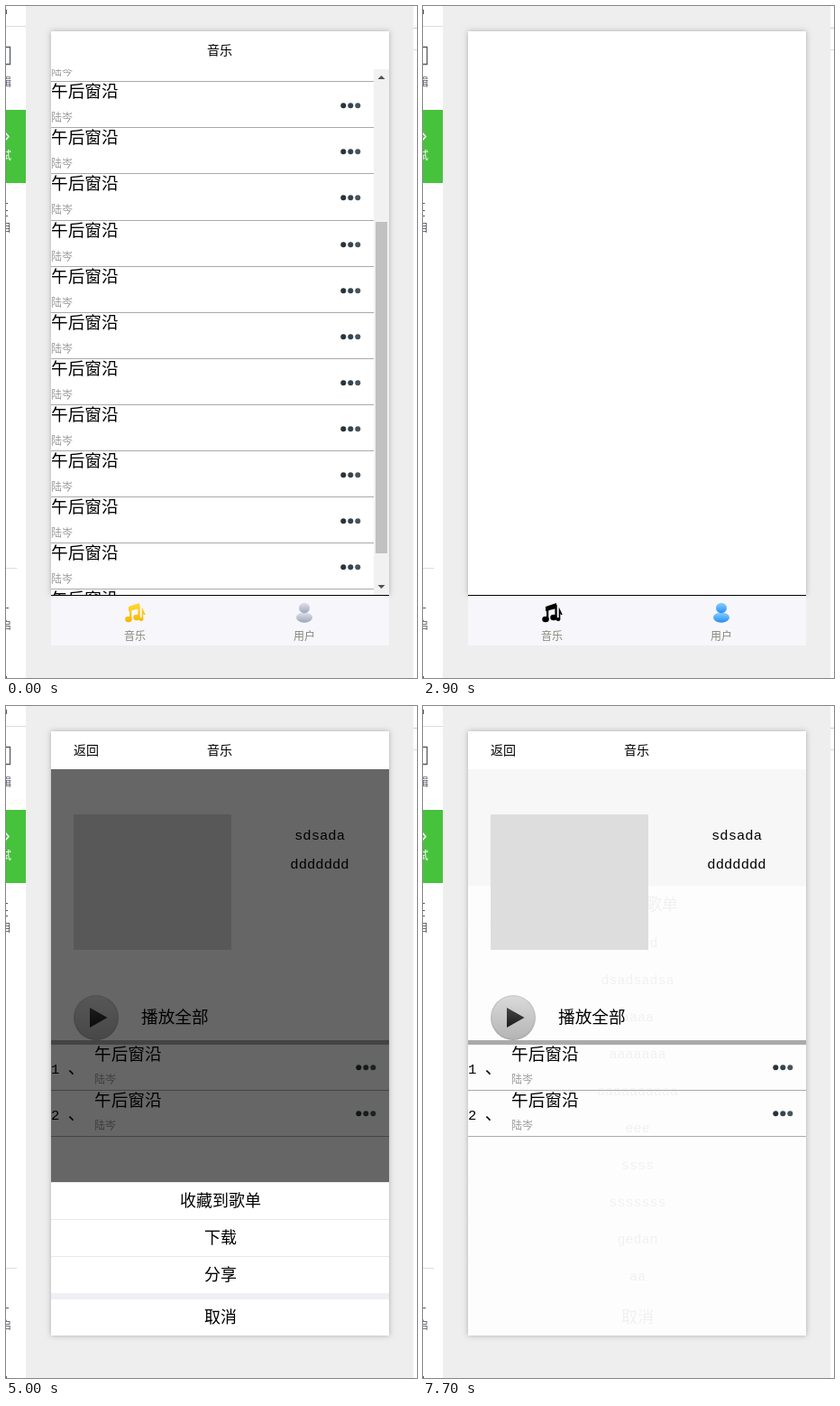
Animation of 456 by 744 pixels, one loop 9100 ms. Source, as an HTML page with a canvas:

```html
<!DOCTYPE html>
<html lang="zh">
<head>
<meta charset="utf-8">
<title>音乐</title>
<style>
html, body { margin: 0; width: 100%; height: 100%; overflow: hidden; background: #eee; }
canvas { display: block; }
</style>
</head>
<body>
<canvas id="stage" width="456" height="744"></canvas>
<script>
const c = document.getElementById('stage').getContext('2d');
const LOOP = 9100, ROW = 51.07;
const SONG = '午后窗沿', SINGER = '陆岑';
const LISTS = ['sdasd', 'dsadsadsa', 'aaaa', 'aaaaaaa', 'aaaaaaaaaa', 'eee', 'ssss', 'sssssss', 'gedan', 'aa'];
const COUNTS = [2, 2, 1, 2, 1, 1, 2, 2, 1, 1];
const ACTIONS = ['收藏到歌单', '下载', '分享'];
const PICK = ['+ 新建歌单', ...LISTS];
const SLIDE = [292, 110, 42, 10, 0];

function box(x, y, w, h, color) {
  c.fillStyle = color;
  c.fillRect(x, y, w, h);
}

// Latin runs are set half as wide as a CJK character.
function text(s, x, mid, size, color = '#000', center = false) {
  const runs = s.match(/[ -~]+|[^ -~]+/g);
  const latin = r => r.charCodeAt(0) < 128;
  const width = r => r.length * size * (latin(r) ? 0.5 : 1);
  if (center) x -= runs.reduce((sum, r) => sum + width(r), 0) / 2;
  c.fillStyle = color;
  for (const r of runs) {
    c.font = latin(r)
      ? `${size / 1.2}px "Liberation Mono", monospace`
      : `300 ${size}px "Noto Sans CJK SC Light", "Noto Sans CJK SC", "Noto Sans CJK", sans-serif`;
    c.fillText(r, x, mid + size * 0.37);
    x += width(r);
  }
}

function shape(color, ...points) {
  c.fillStyle = color;
  c.beginPath();
  points.forEach(([x, y]) => c.lineTo(x, y));
  c.fill();
}

function oval(x, y, rx, ry, color) {
  c.fillStyle = color;
  c.beginPath();
  c.ellipse(x, y, rx, ry, 0, 0, 7);
  c.fill();
}

function line(color, width, ...points) {
  c.strokeStyle = color;
  c.lineWidth = width;
  c.beginPath();
  points.forEach(([x, y]) => c.lineTo(x, y));
  c.stroke();
}

function shade(y1, y2, from, to) {
  const g = c.createLinearGradient(0, y1, 0, y2);
  g.addColorStop(0, from);
  g.addColorStop(1, to);
  return g;
}

function clipped(x, y, w, h, draw) {
  c.save();
  c.beginPath();
  c.rect(x, y, w, h);
  c.clip();
  draw();
  c.restore();
}

function dots(x, y) {
  ['#2a333a', '#37434c', '#455560'].forEach((color, i) => oval(x + 8 * i, y, 3, 3, color));
}

function note(x, y, color) {
  oval(x - 6, y + 7, 4.2, 3.4, color);
  oval(x + 6, y + 5, 4.2, 3.4, color);
  shape(color, [x - 5, y - 7], [x + 10, y - 10], [x + 10, y - 4], [x - 5, y - 1]);
  box(x - 5, y - 6, 3, 13, color);
  box(x + 7.5, y - 9, 2.7, 14, color);
}

function surroundings() {
  box(0, 0, 456, 744, '#eee');
  box(0, 0, 22, 744, '#fff');
  box(452, 0, 4, 744, '#fff');
  box(452, 24, 4, 1, '#ccc');
  box(452, 48, 4, 1, '#ddd');
  box(0, 22, 22, 1, '#ddd');
  box(0, 622, 12, 1, '#ddd');
  box(0, 115, 22, 81, '#47c23c');
  const ink = '#555b66';
  line(ink, 1.3, [-6, 45.5], [4.5, 45.5], [4.5, 64.5], [-6, 64.5]);
  line('#fff', 1.5, [-1, 140], [3, 144.5], [-1, 149]);
  [218, 226, 232].forEach(y => box(0, y, 2, 1, ink));
  box(0, 666, 3, 1, ink);
  box(0, 4, 1, 5, ink);
  box(0, 742, 1, 2, ink);
  text('编辑', -18, 85, 12, ink);
  text('调试', -18, 166, 12, '#fff');
  text('项目', -18, 246, 12, ink);
  text('重启', -18, 686, 12, ink);
}

function phone(title, height, back) {
  c.save();
  c.shadowColor = 'rgba(0,0,0,.28)';
  c.shadowBlur = 6;
  box(50, 28, 375, height, '#fff');
  c.restore();
  text(title, 237, 49, 14, '#000', true);
  if (back) text('返回', 75, 49, 14);
}

function scrollbar(top, height) {
  box(408, 70, 17, 582, '#f1f1f1');
  box(410, top, 13, height, '#c1c1c1');
  shape('#505050', [412.5, 81], [420.5, 81], [416.5, 77]);
  shape('#505050', [412.5, 641], [420.5, 641], [416.5, 645]);
}

function tabs(user) {
  box(50, 652, 375, 56, '#f7f7fb');
  box(50, 652, 375, 1, '#000');
  const color = user ? '#000' : shade(661, 684, '#ffd836', '#f5b400');
  oval(136, 679, 3.8, 3.2, color);
  oval(145, 677, 3.8, 3.2, color);
  shape(color, [136, 665], [148, 661], [148, 667], [136, 670]);
  box(137, 666, 2.3, 13, color);
  box(146.4, 663, 2.3, 14, color);
  oval(150, 679, 2.4, 2, color);
  line(color, 1.6, [151.5, 679], [151.5, 669], [154, 674]);
  const [light, dark] = user ? ['#8fd3ff', '#2389f5'] : ['#e2e4ec', '#9ba3b8'];
  oval(331, 677, 9, 5.7, shade(671, 683, light, dark));
  oval(331, 666.5, 6, 5.8, shade(660, 673, light, dark));
  text('音乐', 131, 697.5, 12, '#85857a');
  text('用户', 319, 697.5, 12, '#85857a');
}

function musicPage() {
  phone('音乐', 624);
  clipped(50, 70, 375, 582, () => {
    for (let i = -1; i < 12; i++) {
      const y = Math.round(83.35 + ROW * i);
      box(50, y, 358, 1, '#aaa');
      text(SONG, 50, y + 11, 18.67);
      text(SINGER, 50, y + 41, 12, '#999');
      dots(374.3, y + 27.3);
    }
    scrollbar(239, 367);
  });
  tabs(false);
}

function menuIcons() {
  const green = '#19f590';
  c.lineJoin = 'round';
  line(green, 2, [71, 97], [74, 87], [86, 87], [89, 97], [89, 105], [71, 105], [71, 97]);
  line(green, 2, [71, 98], [76, 98], [77, 101], [83, 101], [84, 98], [89, 98]);
  line(green, 2, [80, 89], [80, 95]);
  line(green, 2, [77, 93], [80, 96], [83, 93]);
  c.lineWidth = 2;
  c.beginPath();
  c.arc(80, 147, 9, 0, 7);
  c.stroke();
  line(green, 2, [79.5, 141], [79.5, 148], [85, 148]);
  note(80, 198, green);
}

function userPage(loaded) {
  phone('我的歌单', 624);
  clipped(50, 70, 375, 582, () => {
    ['下载音乐', '最近播放', '我创建的歌单'].forEach((s, i) => {
      text(s, 101, 94 + 51 * i, 18.67);
      box(50, 120 + 51 * i, 375, 1, '#aaa');
    });
    menuIcons();
    if (!loaded) return;
    box(50, 223, 50, 429, '#cacaca');
    LISTS.forEach((name, i) => {
      const y = 222 + 51 * i;
      text(name, 110, y + 19, 12);
      text(COUNTS[i] + '首 已下载首', 110, y + 42, 12);
      box(100, y + 51, 325, 1, '#c8c8c8');
    });
    scrollbar(87, 481);
  });
  tabs(true);
}

function details() {
  box(75, 120, 175, 150, '#ddd');
  text('sdsada', 348, 141, 18.67, '#000', true);
  text('ddddddd', 348, 173, 18.67, '#000', true);
  oval(100, 345, 25, 25, shade(320, 370, '#cfcfcf', '#a8a8a8'));
  oval(100, 345, 23.5, 23.5, shade(321, 369, '#dadada', '#b4b4b4'));
  shape(shade(334, 356, '#444', '#1c1c1c'), [93, 334], [112.5, 345], [93, 356]);
  text('播放全部', 150, 344, 18.67);
  box(50, 370, 375, 5, '#aaa');
  [1, 2].forEach((n, i) => {
    const y = 374 + 51 * i;
    text(n + ' 、', 50, y + 26, 18.67);
    text(SONG, 98, y + 11, 18.67);
    text(SINGER, 98, y + 40, 12, '#999');
    dots(391.3, y + 26.3);
    box(50, y + 51, 375, 1, '#aaa');
  });
}

function sheet(items) {
  const top = 650 - 41 * items.length;
  box(50, top, 375, 697 - top, '#fff');
  items.forEach((s, i) => {
    box(50, top + 41 * i, 375, 1, '#e8e8ea');
    text(s, 238, top + 20 + 41 * i, 18, '#000', true);
  });
  box(50, 650, 375, 7, '#efeff4');
  text('取消', 238, 676, 18, '#000', true);
}

function mask(alpha) {
  box(50, 70, 375, 627, `rgba(0,0,0,${alpha})`);
}

function slide(step) {
  userPage(true);
  clipped(50, 28, 402, 624, () => box(50 + SLIDE[step], 28, 375, 624, '#fff'));
}

function closing() {
  box(50, 70, 375, 129, '#f7f7f7');
  box(50, 199, 375, 498, '#fdfdfd');
  c.save();
  c.globalAlpha = 0.05;
  sheet(PICK);
  c.restore();
  details();
}

function draw(t) {
  surroundings();
  if (t < 1000) return musicPage();
  if (t < 2500) return userPage(t >= 1100);
  if (t < 3300) return slide(Math.min(4, (t - 2500) / 100));

  phone('音乐', 669, true);
  if (t < 3900) {
    box(50, 70, Math.min(375, 307 * (t - 3300) / 400), 2, '#47c23c');
  } else if (t < 7700) {
    details();
    if (t >= 6200) {
      mask(Math.min(0.6, (t - 6200) / 100 * 0.3));
      sheet(PICK);
    } else if (t >= 4800) {
      mask(Math.min(0.6, 0.03 + (t - 4800) / 100 * 0.3));
      sheet(ACTIONS);
    }
  } else {
    closing();
  }
}

const start = performance.now();
function tick() {
  const t = (performance.now() - start) % LOOP;
  draw(Math.floor(t / 100) * 100);
  requestAnimationFrame(tick);
}
tick();
</script>
</body>
</html>
```
